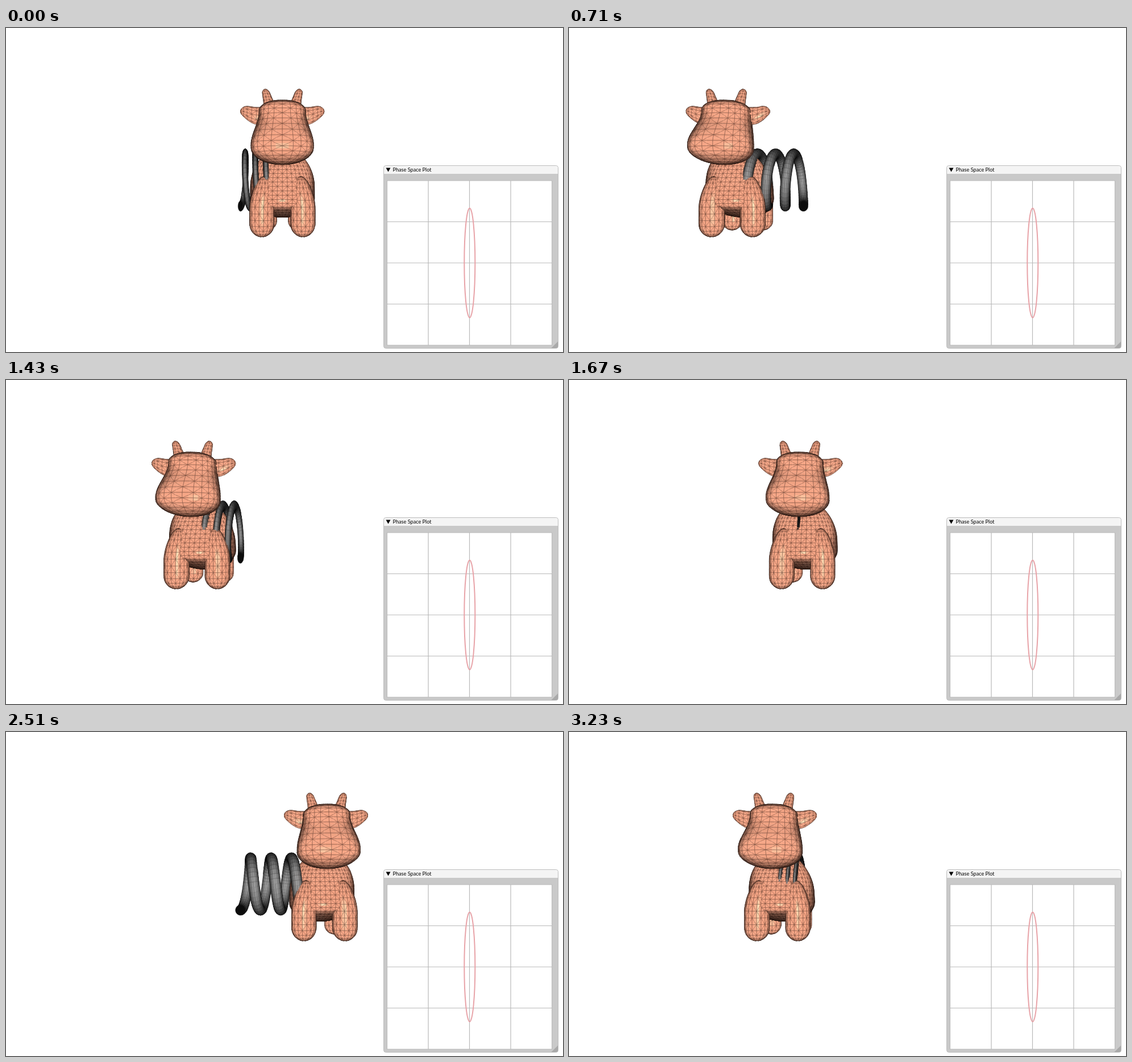
Recreate the animation shown at these times as an HTML page with a canvas. Size 980x571 px, loop 3330 ms.

```html
<!DOCTYPE html>
<html lang="en">
<head>
<meta charset="utf-8">
<title>Phase Space Plot</title>
<style>
  html, body { margin: 0; width: 100%; height: 100%; overflow: hidden; background: #fff; }
  canvas, svg { position: absolute; left: 0; top: 0; }
</style>
</head>
<body>
<canvas width="980" height="571"></canvas>
<svg width="980" height="571">
  <rect x="664.5" y="242.5" width="307" height="322" rx="4" fill="#c9c9c9" stroke="#bdbdbd"/>
  <path d="M665 257V246.500q0-3.500 3.500-3.500h299q3.500 0 3.500 3.500V257z" fill="#f4f4f4"/>
  <path d="M668.500 246.500h8l-4 7z"/>
  <text x="680.500" y="253.300" font-family="Lato, 'Open Sans', sans-serif" font-size="9.15">Phase Space Plot</text>
  <path d="M971 552.500V561q0 3-3 3h-8.500z" fill="#a9a9a9"/>
  <rect x="670.500" y="269" width="290" height="290" fill="#fff" stroke="#b9b9b9"/>
  <path d="M743 269v290M815.500 269v290M888 269v290M670.500 341.500h290M670.500 414h290M670.500 486.500h290" stroke="#b9b9b9" stroke-width="1.2"/>
  <ellipse cx="815.800" cy="414" rx="9.500" ry="96.500" fill="none" stroke="#e8a3a8" stroke-width="2"/>
</svg>
<script>
const ctx = document.querySelector('canvas').getContext('2d');
const CX = 488, CY = 285.5, DIST = 690;      // camera axis and distance
const REST = 413, SWING = 155.5, LOOP = 3330, LAST = 27;
const SKIN = [246, 166, 134], STEEL = [155, 155, 155];
const TAU = 2 * Math.PI;

const unproject = z => (DIST - z) / DIST;
const project = ([x, y, z]) => [CX + x / unproject(z), CY + y / unproject(z)];
const sub = (a, b) => a.map((v, i) => v - b[i]);
const dot = (a, b) => a[0] * b[0] + a[1] * b[1] + a[2] * b[2];
const cross = (a, b) => [a[1] * b[2] - a[2] * b[1], a[2] * b[0] - a[0] * b[2], a[0] * b[1] - a[1] * b[0]];
const unit = a => { const l = Math.hypot(...a) || 1; return a.map(v => v / l); };
const mean = pts => [0, 1, 2].map(i => pts.reduce((s, p) => s + p[i], 0) / pts.length);
const smooth = (a, b, x) => { const t = Math.max(0, Math.min(1, (x - a) / (b - a))); return t * t * (3 - 2 * t); };

// Quads of a surface; point(u, v) gives a vertex, core(u) the middle of its ring.
function mesh(rows, cols, point, core, base, triangles) {
  const faces = [];
  const grid = Array.from({ length: rows + 1 }, (_, i) =>
    Array.from({ length: cols }, (_, j) => point(i / rows, j / cols)));
  for (let i = 0; i < rows; i++) {
    const c = core((i + 0.5) / rows);
    for (let j = 0; j < cols; j++) {
      const k = (j + 1) % cols;
      const pts = [grid[i][j], grid[i][k], grid[i + 1][k], grid[i + 1][j]];
      const mid = mean(pts);
      let n = unit(cross(sub(pts[2], pts[0]), sub(pts[3], pts[1])));
      if (dot(n, sub(mid, c)) < 0) n = n.map(v => -v);
      let lines = [[0, 1], [0, 3]];
      if (triangles) {
        // Each wire cell spans two by two quads.
        lines = [i % 2 ? [3, 2] : [0, 1], j % 2 ? [1, 2] : [0, 3]];
        const odd = ((i >> 1) + (j >> 1)) % 2;
        if ((i + j) % 2 === odd) lines.push(odd ? [1, 3] : [0, 2]);
      }
      faces.push({ pts, n, mid, lines, base });
    }
  }
  return faces;
}

// 1 along a limb, falling off as an ellipse over the lengths r0 and r1 at its ends.
const arc = d => Math.sqrt(1 - Math.min(1, Math.max(0, d)) ** 2);
const cap = (u, from, to, r0, r1) => arc((from + r0 - u) / r0) * arc((u - to + r1) / r1);

// shape(u) gives the cross centre, cross half size, depth and depth half size at u on the axis.
function loft(from, to, rows, cols, shape, { side = 1, flat = false, round = 1 } = {}) {
  const bend = v => Math.sign(v) * Math.abs(v) ** round;
  const along = t => from + (to - from) * (1 - Math.cos(t * Math.PI)) / 2;
  const place = (u, c, z, zRef) => {
    const k = unproject(zRef);
    return flat ? [side * u * k, (c - CY) * k, z] : [side * c * k, (u - CY) * k, z];
  };
  const point = (t, v) => {
    const u = along(t), [c, a, z, b] = shape(u);
    return place(u, c + a * bend(Math.cos(v * TAU)), z + b * bend(Math.sin(v * TAU)), z);
  };
  const core = t => { const u = along(t), [c, , z] = shape(u); return place(u, c, z, z); };
  return mesh(rows, cols, point, core, SKIN, true);
}

function head(y) {
  const end = cap(y, 129, 240.5, 18, 29);
  const muzzle = smooth(150, 207, y);
  return [0, (41 + 14 * muzzle) * end, 4 + 32 * muzzle - 10 * smooth(215, 240, y), (38 + 5 * muzzle) * end];
}
function body(y) {
  const end = cap(y, 212, 333, 68, 32);
  return [0, 56 * end, -50 - 35 * smooth(225, 300, y) - 40 * smooth(310, 333, y), (20 + 65 * smooth(225, 305, y)) * end];
}
function foreleg(y) {
  const r = 21.7 * cap(y, 262, 368, 55, 23);
  return [32 + 4 * smooth(266, 320, y), r, -27, r];
}
function hindleg(y) {
  const r = 17 * cap(y, 280, 356, 20, 16);
  return [27, r, -138, r];
}
function horn(y) {
  const r = (6 + 3.5 * smooth(105, 140, y)) * cap(y, 108, 138, 7, 1);
  return [30 - 7 * smooth(104, 140, y), r, 9, r];
}
function ear(x) {
  const end = cap(x, 25, 73.5, 10, 30);
  return [147 + 8 * smooth(74, 44, x), 15 * end, 0, 8 * end];
}

const cow = [...loft(129, 240.5, 36, 48, head, { round: 0.82 }), ...loft(212, 333, 52, 88, body)];
for (const side of [-1, 1]) {
  cow.push(
    ...loft(262, 368, 28, 36, foreleg, { side }),
    ...loft(280, 356, 20, 28, hindleg, { side }),
    ...loft(108, 138, 16, 20, horn, { side }),
    ...loft(25, 73.5, 18, 24, ear, { side, flat: true }));
}

// A helix scaled as a whole along x, so the tube flattens when compressed.
function spring(cowX) {
  const depth = -80, k = unproject(depth), turns = 3.6;
  const stretch = (cowX - REST) / 150;
  const R = 46 * k, r = 9 * k, pitch = 35.6 * k;
  const helix = u => {
    const a = u * turns * TAU;
    return [pitch * u * turns, R * Math.cos(a), -R * Math.sin(a)];
  };
  const place = ([x, y, z]) => [(412.5 - CX) * k + x * stretch, (268 - CY) * k + y, depth + z];
  const core = u => place(helix(u));
  const point = (u, v) => {
    const a = u * turns * TAU, out = [0, Math.cos(a), -Math.sin(a)];
    const across = cross(unit([pitch / TAU, -R * Math.sin(a), -R * Math.cos(a)]), out);
    const c = r * Math.cos(v * TAU), s = r * Math.sin(v * TAU);
    return place(helix(u).map((p, i) => p + c * out[i] + s * across[i]));
  };
  const tube = mesh(150, 18, point, core, STEEL, false);
  const rim = Array.from({ length: 24 }, (_, i) => point(0, i / 24));
  const mid = core(0);
  mid[2] += 8;
  tube.push({ pts: rim, n: [0, 0, 1], mid, lines: [], base: [12, 12, 12] });
  return tube;
}

function paint(face, dx) {
  const { n, mid, base, lines } = face;
  const facing = dot(n, unit([-mid[0] - dx, -mid[1], DIST - mid[2]]));
  if (facing <= 0) return;
  const pts = face.pts.map(([x, y, z]) => project([x + dx, y, z]));
  const skin = base === SKIN;
  const light = skin ? 0.08 + 0.92 * smooth(-0.15, 0.75, facing) : 0.05 + 0.95 * facing ** 1.3;
  const gloss = skin ? 0.75 * facing ** 130 : 0;
  const [r, g, b] = base.map((v, i) => v * light + ([255, 244, 200][i] - v * light) * gloss);
  ctx.fillStyle = ctx.strokeStyle = `rgb(${r},${g},${b})`;
  ctx.lineWidth = 0.5;
  ctx.beginPath();
  pts.forEach(p => ctx.lineTo(...p));
  ctx.closePath();
  ctx.fill();
  ctx.stroke();
  ctx.strokeStyle = skin ? 'rgba(20,8,4,.7)' : 'rgba(0,0,0,.7)';
  ctx.lineWidth = skin ? 0.45 : 0.35;
  ctx.beginPath();
  for (const [a, c] of lines) {
    ctx.moveTo(...pts[a]);
    ctx.lineTo(...pts[c]);
  }
  ctx.stroke();
}

function cowAt(step) {
  const u = step / LAST;
  return REST - SWING * Math.cos(-2.061 + 7.107 * u - 0.09 * Math.sin(Math.PI * u));
}

function draw(step) {
  const x = cowAt(step), dx = x - CX;
  ctx.clearRect(0, 0, 980, 571);
  [...cow.map(f => [f, dx]), ...spring(x).map(f => [f, 0])]
    .sort((a, b) => a[0].mid[2] - b[0].mid[2])
    .forEach(([f, shift]) => paint(f, shift));
}

const start = performance.now();
let shown = -1;
function tick() {
  const t = (performance.now() - start) % LOOP;
  const step = Math.min(LAST, Math.floor((t < 350 ? t : t + 10) / 120));
  if (step !== shown) draw(shown = step);
  requestAnimationFrame(tick);
}
tick();
</script>
</body>
</html>
```
